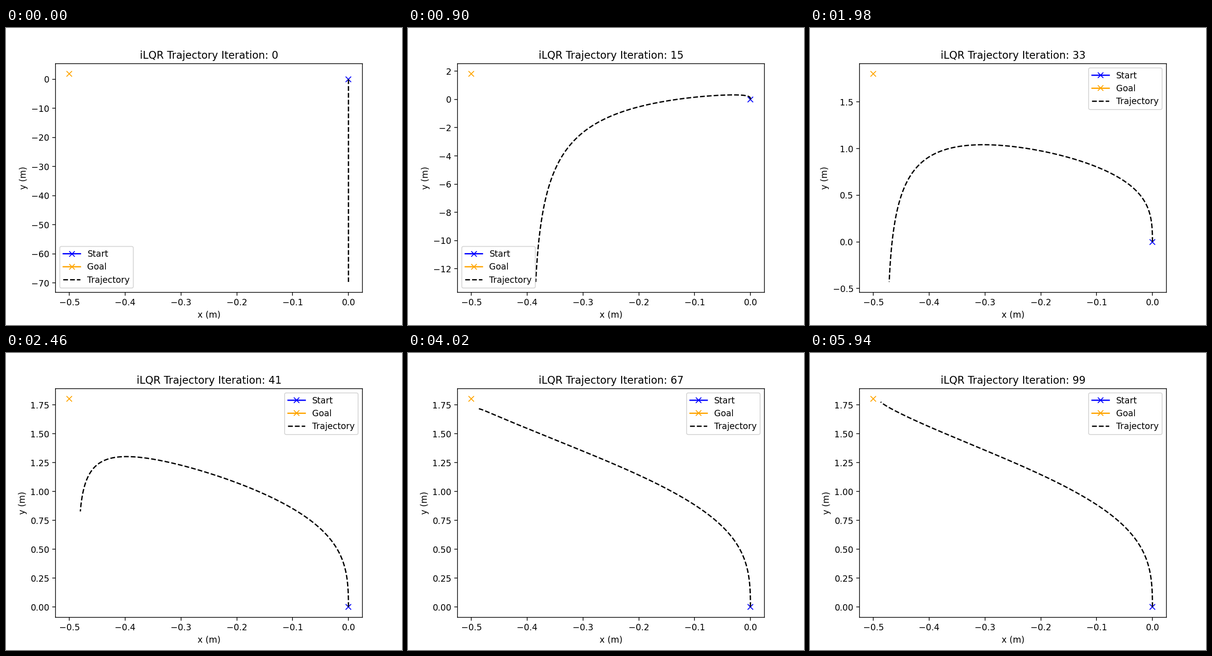
Recreate the animation shown at these times as a matplotlib script. Size 864 px wide and 648 px high, loop 6 s.

```python
import numpy as np
import matplotlib.pyplot as plt
from matplotlib.animation import FuncAnimation

FRAMES = 100
INTERVAL = 60
GOAL = (-0.5, 1.8)
DROP = 69.64   # depth of the uncontrolled fall at the end of the horizon
STEP = 0.1     # share of the remaining error removed per iteration

plt.rcParams["path.snap"] = False   # keep lines at their exact subpixel places

s = np.linspace(0, 1, 201)              # time along the horizon
pace = s * (1 + 0.06 * (1 - s) ** 2)    # controlled motion leads slightly early on


def settled_x(t):
    u = t * (6.05 - 4.4 * np.exp(-5.8 * t) - 0.5 * t**6)
    return GOAL[0] * (1 - (1 + u) * np.exp(-u))


def settled_y(t):
    return GOAL[1] * (1 - np.exp(-(3.6 * t + 0.62 * t**2 + 0.14 * t**8)))


def trajectory(iteration):
    """Blend from free fall to the converged path; x lags while error is large."""
    c = (1 - STEP) ** iteration
    x = (1 - c) * settled_x(pace * (1 - 0.32 * c))
    y = (1 - c) * settled_y(pace) - c * DROP * s**2
    return x, y


fig, ax = plt.subplots(figsize=(6.4, 4.8), dpi=135)


def draw(iteration):
    ax.clear()
    ax.plot(0, 0, color="blue", marker="x", label="Start")
    ax.plot(*GOAL, color="orange", marker="x", label="Goal")
    ax.plot(*trajectory(iteration), "k--", label="Trajectory")
    ax.set_title(f"iLQR Trajectory Iteration: {iteration}")
    ax.set_xlabel("x (m)")
    ax.set_ylabel("y (m)")
    ax.legend(loc="best")
    return ax.lines


anim = FuncAnimation(fig, draw, frames=FRAMES, interval=INTERVAL,
                     init_func=lambda: [], repeat=True, repeat_delay=0)
plt.show()
```
